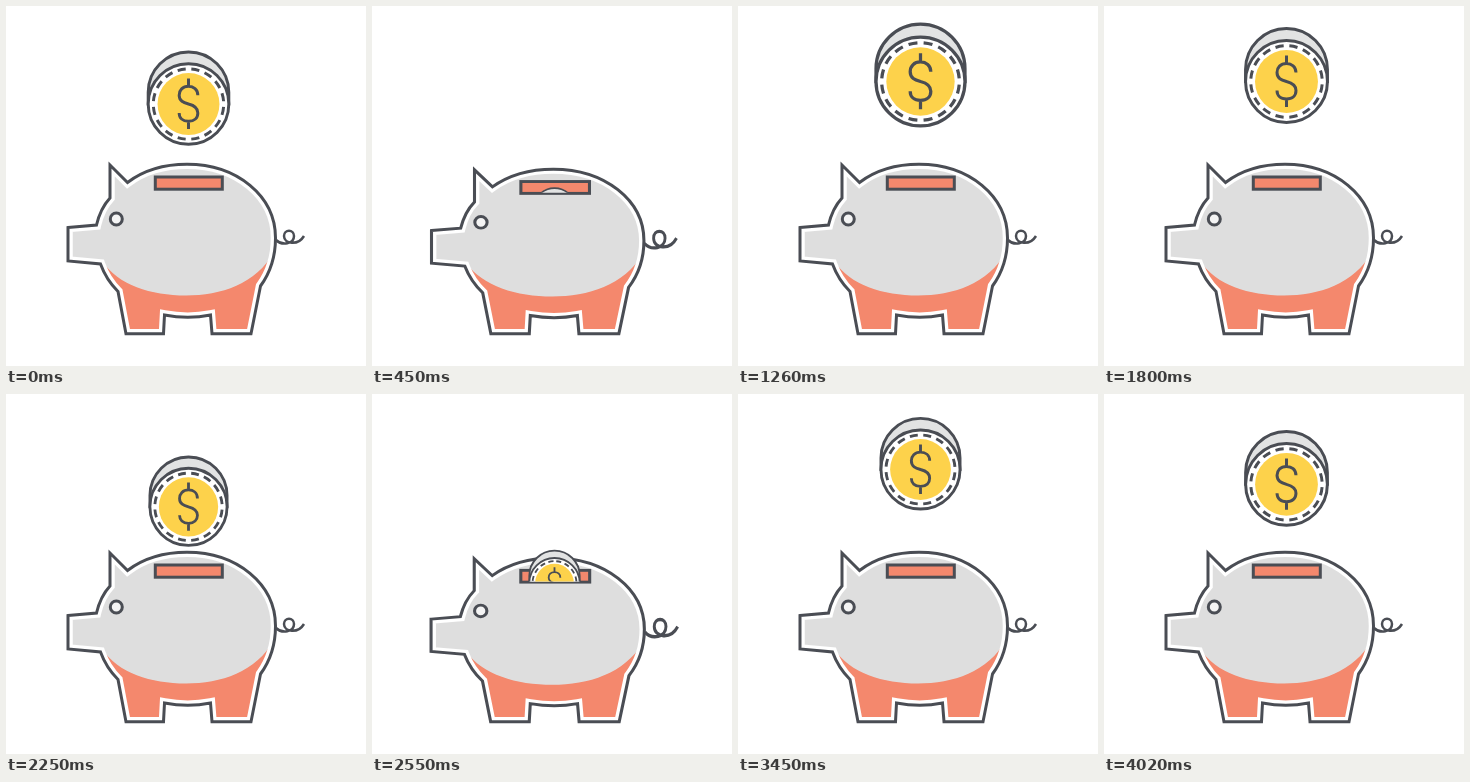
These frames come from a looping animation (360x360 px, 4.05 s). An HTML page:

```html
<!DOCTYPE html>
<html lang="en">
<head>
<meta charset="utf-8">
<title>Piggy bank</title>
<style>
html, body { margin: 0; height: 100%; overflow: hidden; background: #fff; }
svg { display: block; width: 100vw; height: 100vh; }
.line { fill: none; stroke: #4a4d54; stroke-width: 3; }
</style>
</head>
<body>
<svg viewBox="0 0 360 360">
  <defs>
    <path id="body" d="M62 221.500 L90.500 219 C93 208.500 97.500 199 104 192 V159 L121.500 176.500 C138 164 158 158.300 181 158.300
      C231 158.300 269.500 190 269.500 232 C269.500 251 264 267 254.500 280 L245 327.700 H206 L204.500 309 Q182 313.500 158.500 309
      L157.500 327.700 H120 L112 285.500 C104.500 278 98.500 269 94.500 258 L62 255 Z"/>
    <clipPath id="above"><rect id="aboveRect" width="360" height="183"/></clipPath>
  </defs>

  <g id="pig">
    <use href="#body" fill="#dedede"/>
    <clipPath id="inside"><use href="#body"/></clipPath>
    <path clip-path="url(#inside)" fill="#f4886d"
      d="M96 255 C112 279 145 289.500 180 289.500 C215 289.500 250 278 268 246 V330 H96 Z"/>
    <use href="#body" fill="none" stroke="#fff" stroke-width="9.500"/>
    <use href="#body" class="line"/>
    <rect class="line" x="149.300" y="171" width="67" height="12.200" style="fill:#f4886d"/>
    <circle class="line" cx="110.300" cy="213" r="6" style="fill:#f4f4f4"/>
    <g id="tail">
      <path class="line" style="stroke-width:2.500"
        d="M270 234 C276 240 288 238 288 230 C288 223 278 223 278 230 C278 238 292 240 298 230"/>
    </g>
  </g>

  <g clip-path="url(#above)">
    <g id="coin">
      <path class="line" style="fill:#e2e3e3" d="M-41 0 V-12 A41 41 0 0 1 41 -12 V0 Z"/>
      <circle class="line" r="41" style="fill:#fff"/>
      <circle class="line" r="35.800" pathLength="216" stroke-dasharray="8 5.500" transform="rotate(-85.400)"/>
      <circle r="31.500" fill="#fdd24b"/>
      <path class="line" d="M0 -26 V-18 M0 17.500 V25.500 M9.500 -9 C9.500 -15 5 -18 0 -18 C-6 -18 -9.500 -14 -9.500 -9
        C-9.500 -3 -5 -1.500 0 0 C6 1.500 9.500 4 9.500 9 C9.500 14 6 17.500 0 17.500 C-6 17.500 -9.500 14 -9.500 9"/>
    </g>
  </g>
</svg>
<script>
const LOOP = 4050, DROP = 2160, REST_Y = 75.5, REST_R = 42, FLOOR = 328;
const $ = id => document.getElementById(id);
const clamp = x => Math.min(1, Math.max(0, x));
const smooth = x => x * x * (3 - 2 * x);

// Radius while the coin pops up, overshoots and settles: [ms, radius]
const POP = [[-120, 0], [150, 45.7], [480, 40.5], [750, REST_R]];

function pop(ms) {
  let r = 0;
  for (let i = 1; i < POP.length; i++) {
    const [t0, r0] = POP[i - 1], [t1, r1] = POP[i];
    if (ms > t0) r = r0 + (r1 - r0) * smooth(clamp((ms - t0) / (t1 - t0)));
  }
  return { y: REST_Y, r, alpha: clamp((ms + 120) / 200) };
}

// Accelerating fall, shrinking on the way into the slot
function fall(ms) {
  const n = ms / 30, shrink = Math.max(0, n - 7);
  return {
    y: REST_Y + 0.207 * n * n,
    r: Math.max(0, REST_R - 0.06 * shrink * shrink),
    alpha: n < 32 ? 1 : 0
  };
}

function coinAt(t) {
  if (t < 900) return fall(t + 312);
  if (t < 1848) return pop(t - 1080);
  if (t < 2800) return fall(t - 1848);
  if (t < 3767) return pop(t - 2970);
  return fall(t - 3767);
}

// 0 at rest, 1 fully squashed
function squashAt(t) {
  const d = t % DROP - 390;
  return Math.cos(Math.PI / 2 * clamp(Math.abs(d) / (d < 0 ? 160 : 240))) ** 2;
}

const scaleAbout = (x, y, sx, sy) =>
  `translate(${x} ${y}) scale(${sx} ${sy}) translate(${-x} ${-y})`;

function draw(t) {
  const k = squashAt(t), sy = 1 - 0.034 * k;
  $("pig").setAttribute("transform", scaleAbout(167, FLOOR, 1 + 0.028 * k, sy));
  $("tail").setAttribute("transform", scaleAbout(270, 232, 1 + 0.14 * k, 1 + 0.4 * k));
  $("aboveRect").setAttribute("height", FLOOR - (FLOOR - 182.6) * sy);

  const { y, r, alpha } = coinAt(t);
  $("coin").setAttribute("transform", `translate(182.500 ${y}) scale(${r / REST_R})`);
  $("coin").setAttribute("opacity", alpha);
}

const start = performance.now();
function tick() {
  draw((performance.now() - start) % LOOP);
  requestAnimationFrame(tick);
}
tick();
</script>
</body>
</html>
```
